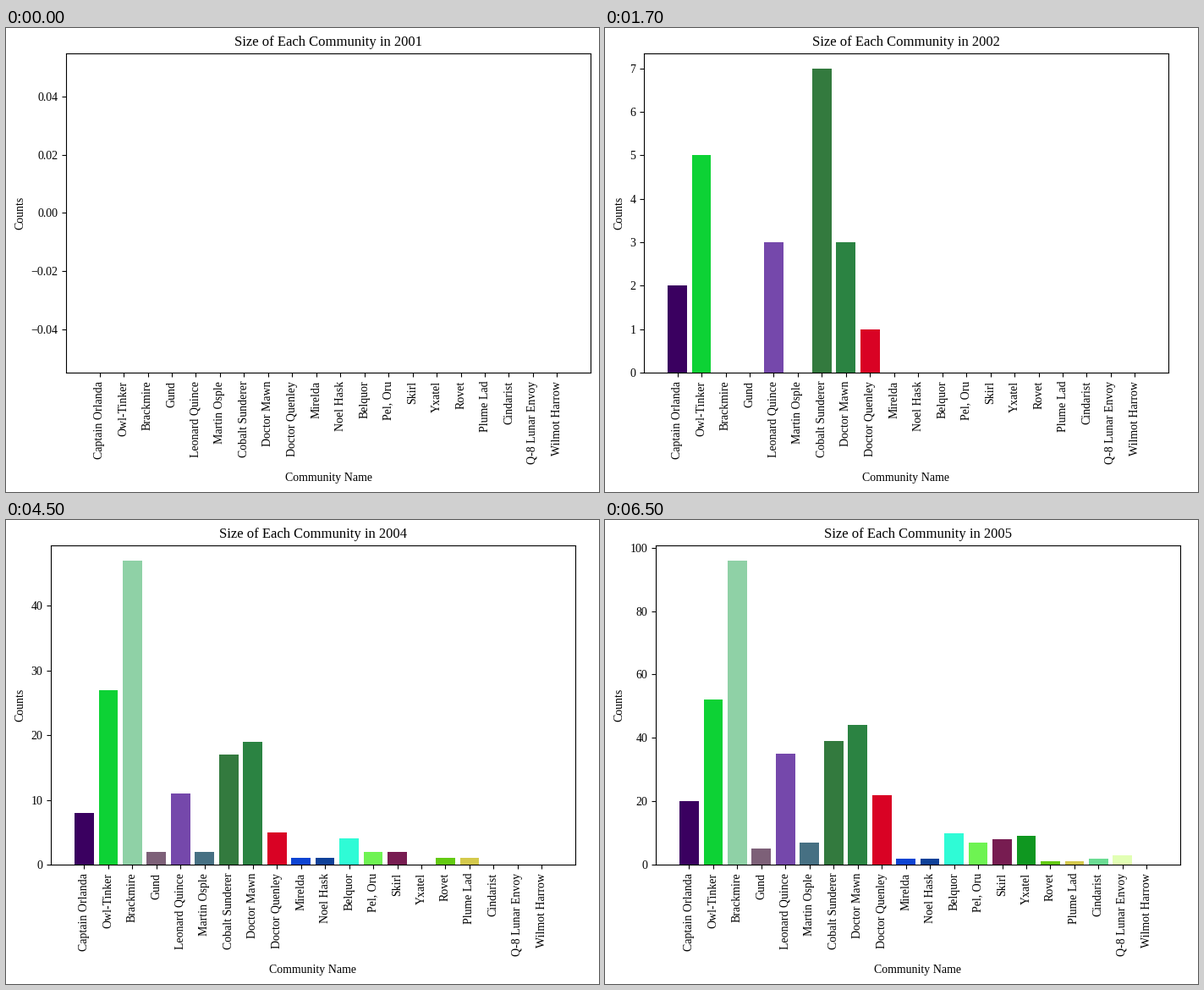
Recreate the animation shown at these times as a matplotlib script. Size 701x548 px, loop 8 s.

```python
import matplotlib.pyplot as plt
from matplotlib.animation import FuncAnimation

WIDTH, HEIGHT, DPI = 701, 548, 100
AXES_BOTTOM, AXES_WIDTH, AXES_HEIGHT = 141, 620, 377.3
MARGIN = 10
TICK_GUTTER = 39  # margin, y label, paddings and tick marks beside the numbers
FIRST_YEAR, LAST_YEAR = 2001, 2005
STEPS, STEPS_PER_YEAR, STEP_MS = 16, 4, 500

plt.rcParams.update({
    "font.family": "Liberation Serif",
    "font.size": 10,
    "axes.titlesize": 12,
})

# name, colour, counts from the year it appears up to LAST_YEAR
COMMUNITIES = [
    ("Captain Orlanda", "#3a0060", (2, 5, 8, 20)),
    ("Owl-Tinker", "#0dd235", (5, 14, 27, 52)),
    ("Brackmire", "#8fd1a6", (6, 47, 96)),
    ("Gund", "#7d6078", (1, 2, 5)),
    ("Leonard Quince", "#7548ab", (3, 6, 11, 35)),
    ("Martin Osple", "#467083", (2, 2, 7)),
    ("Cobalt Sunderer", "#337a3e", (7, 13, 17, 39)),
    ("Doctor Mawn", "#2b8342", (3, 9, 19, 44)),
    ("Doctor Quenley", "#d90224", (1, 1, 5, 22)),
    ("Mirelda", "#0d44d3", (1, 1, 2)),
    ("Noel Hask", "#0f4199", (1, 2)),
    ("Belquor", "#2ffbd6", (2, 4, 10)),
    ("Pel, Oru", "#6ef352", (1, 2, 7)),
    ("Skirl", "#771c51", (2, 2, 8)),
    ("Yxatel", "#0f9720", (9,)),
    ("Rovet", "#63ca12", (1, 1)),
    ("Plume Lad", "#d4c94c", (1, 1, 1)),
    ("Cindarist", "#6bdc93", (2,)),
    ("Q-8 Lunar Envoy", "#e2ffb4", (3,)),
    ("Wilmot Harrow", "#888888", ()),
]
NAMES, COLORS, HISTORIES = zip(*COMMUNITIES)

fig = plt.figure(figsize=(WIDTH / DPI, HEIGHT / DPI), dpi=DPI, facecolor="white")
ax = fig.add_axes([0, 0, 1, 1])


def count_in(history, year):
    years_back = LAST_YEAR - year
    return history[-1 - years_back] if years_back < len(history) else 0


def place_axes(left):
    ax.set_position([left / WIDTH, AXES_BOTTOM / HEIGHT,
                     AXES_WIDTH / WIDTH, AXES_HEIGHT / HEIGHT])


def draw(step):
    # the opening year shows for a single step
    year = FIRST_YEAR + (step + STEPS_PER_YEAR - 1) // STEPS_PER_YEAR
    counts = [count_in(history, year) for history in HISTORIES]

    ax.clear()
    place_axes(0)
    ax.bar(range(len(NAMES)), counts, color=COLORS)
    ax.set_xlim(-1.39, len(NAMES) + 0.39)
    if any(counts):
        ax.set_ylim(0, 1.05 * max(counts))
    else:
        ax.set_ylim(-0.055, 0.055)

    number_width = max(label.get_window_extent().width
                       for label in ax.get_yticklabels())
    place_axes(TICK_GUTTER + number_width)

    ax.set_xticks(range(len(NAMES)), NAMES, rotation=90)
    ax.set_title(f"Size of Each Community in {year}")
    ax.set_xlabel("Community Name", va="bottom")
    ax.xaxis.set_label_coords(0.5, (MARGIN - AXES_BOTTOM) / AXES_HEIGHT)
    ax.set_ylabel("Counts")
    return []


animation = FuncAnimation(fig, draw, frames=STEPS, init_func=lambda: [],
                          interval=STEP_MS, repeat=True, repeat_delay=0)
plt.show()
```
